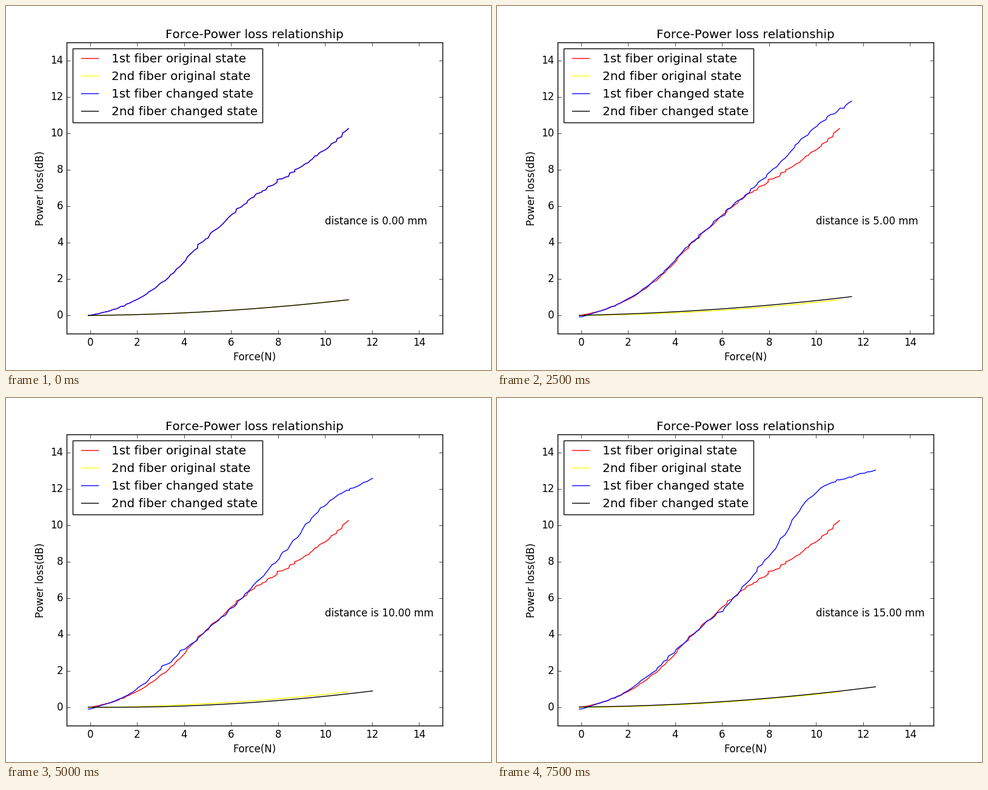
A matplotlib script that plays this animation: 800 by 600 pixels, repeating every 8000 ms.

```python
import numpy as np
import matplotlib.pyplot as plt
from matplotlib.animation import FuncAnimation

plt.style.use("classic")
plt.rcParams.update({
    "font.family": "DejaVu Sans",
    "text.kerning_factor": 6,
    "figure.dpi": 100,
    "savefig.dpi": "figure",
    "figure.facecolor": "white",
})

FRAMES = 16  # one frame per millimetre of distance
INTERVAL = 500

# Key points of the first fiber's loss at distance 0
KEY_FORCE = np.array([0, 1, 3, 5, 7, 9, 11, 12, 13])
KEY_LOSS = np.array([0, .32, 1.72, 4.33, 6.56, 8.18, 10.27, 11.7, 12.9])


def smooth(x, px, py):
    """Cubic Hermite curve through the points."""
    slope = np.gradient(py, px)
    i = np.clip(np.searchsorted(px, x) - 1, 0, len(px) - 2)
    h = px[i + 1] - px[i]
    t = (x - px[i]) / h
    return (py[i] * (1 + 2 * t) * (1 - t) ** 2
            + py[i + 1] * t * t * (3 - 2 * t)
            + h * slope[i] * t * (1 - t) ** 2
            - h * slope[i + 1] * t * t * (1 - t))


def bell(x, center, width):
    return np.exp(-((x - center) / width) ** 2)


def forces(d, count):
    return np.linspace(-.08, 11 + .102 * d, count)


def fiber_1(d):
    x = forces(d, 95)
    y = np.maximum(smooth(x, KEY_FORCE, KEY_LOSS), 0)
    y += .385 * d ** .72 * bell(x, 10.1, 2.08)
    y += d * (d - 3.8) * (16 - d) / 1000 * bell(x, 3.2, 1.1)
    y -= .013 * d * bell(x, 6, 1)
    y -= .1 * d / (d + 1) * bell(x, 0, .45)
    # Sensor jitter, fading out at both ends
    rng = np.random.default_rng(d)
    fade = np.clip(x / 3, 0, 1) * np.clip((x[-1] - x) * 4, 0, 1)
    return (x + fade * rng.normal(0, .04, x.size),
            y + fade * rng.normal(0, .03, x.size))


def fiber_2(d):
    x = forces(d, 120)
    shift = .04 * d * np.exp(1 - d / 3) - .23 * bell(d, 8.8, 2.2)
    return x, .01 * x + .0062 * x ** 2 + shift * np.tanh(x / 6) + .0015 * d


fig, ax = plt.subplots(figsize=(8, 6))
ax.set(xlim=(-1, 15), ylim=(-1, 15),
       xticks=range(0, 15, 2), yticks=range(0, 15, 2),
       title="Force-Power loss relationship",
       xlabel="Force(N)", ylabel="Power loss(dB)")

ax.plot(*fiber_1(0), color="red", label="1st fiber original state")
ax.plot(*fiber_2(0), color="yellow", label="2nd fiber original state")
line_1, = ax.plot([], [], color="blue", label="1st fiber changed state")
line_2, = ax.plot([], [], color="black", label="2nd fiber changed state")
note = ax.text(10, 5, "")
ax.legend(loc="upper left")


def update(d):
    line_1.set_data(*fiber_1(d))
    line_2.set_data(*fiber_2(d))
    note.set_text(f"distance is {d:.2f} mm")
    return line_1, line_2, note


def init():
    return update(0)


anim = FuncAnimation(fig, update, frames=FRAMES, init_func=init,
                     interval=INTERVAL, repeat=True, repeat_delay=0)
plt.show()
```
